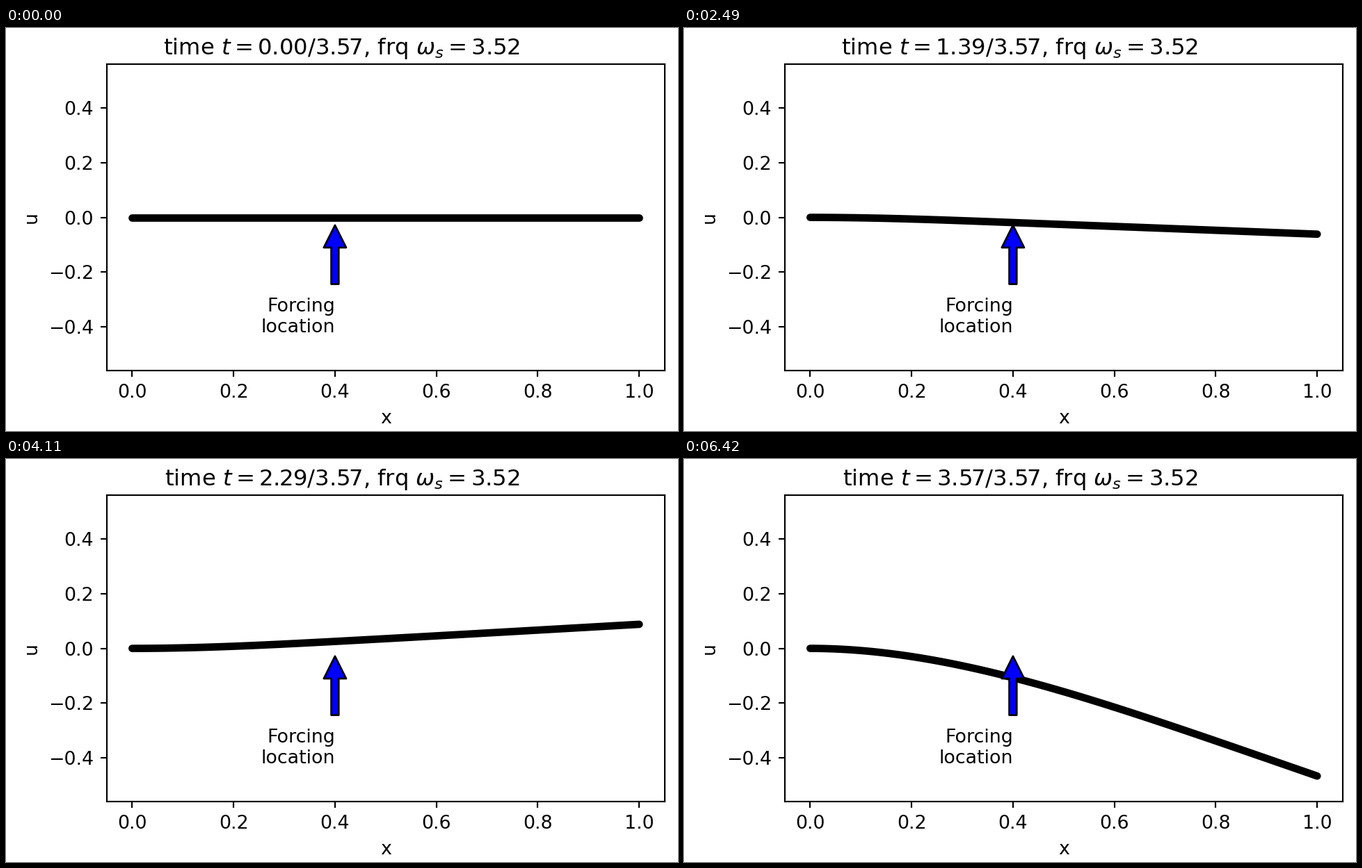
Write a matplotlib script that moves like this. It is 966 by 580 pixels and loops after 6.45 s.

```python
"""Cantilever beam driven at its first natural frequency by a point force."""
import numpy as np
import matplotlib.pyplot as plt
from matplotlib.animation import FuncAnimation
from matplotlib.patches import Polygon

W, H, DPI = 966, 580, 193.2
FRAMES, INTERVAL = 215, 30
X_FORCE = 0.4
MODES = 6

plt.rcParams["font.family"] = "DejaVu Sans"


def wave_number(n):
    """Root of cos(b) cosh(b) = -1 by Newton's method."""
    b = 1.875 if n == 1 else (n - 0.5) * np.pi
    for _ in range(20):
        f = np.cos(b) + 1 / np.cosh(b)
        df = -np.sin(b) - np.sinh(b) / np.cosh(b) ** 2
        b -= f / df
    return b


def mode_shape(b, x):
    s = (np.cosh(b) + np.cos(b)) / (np.sinh(b) + np.sin(b))
    return np.cosh(b * x) - np.cos(b * x) - s * (np.sinh(b * x) - np.sin(b * x))


betas = [wave_number(n) for n in range(1, MODES + 1)]
omega = betas[0] ** 2
t_end = 4 * np.pi / omega
x = np.linspace(0, 1, 101)


def deflection(t):
    """Response from rest to a unit force sin(omega t) at X_FORCE."""
    u = np.zeros_like(x)
    for n, b in enumerate(betas):
        w = b ** 2
        if n == 0:
            q = (np.sin(w * t) - w * t * np.cos(w * t)) / (2 * w ** 2)
        else:
            q = (np.sin(omega * t) - omega / w * np.sin(w * t)) / (w ** 2 - omega ** 2)
        u += q * mode_shape(b, X_FORCE) * mode_shape(b, x)
    return u


times = np.linspace(0, t_end, FRAMES)
u_max = np.abs(deflection(t_end)).max()

# The small margin keeps the pixel size from being truncated
fig = plt.figure(figsize=((W + 0.01) / DPI, (H + 0.01) / DPI), dpi=DPI)
ax = fig.add_subplot()
fig.subplots_adjust(left=0.15, right=0.98, bottom=0.15, top=0.91)
ax.set_xlim(-0.05, 1.05)
ax.set_ylim(-1.2 * u_max, 1.2 * u_max)
ax.set_xticks(np.arange(6) * 0.2)
ax.set_yticks(np.arange(-2, 3) * 0.2)
ax.set_xlabel("x")
ax.set_ylabel("u")

title = fig.suptitle("")
beam, = ax.plot(x, 0 * x, color="black", lw=4, solid_capstyle="round")

# Arrow in points, pointing up at the beam
pt = DPI / 72
cx = ax.transData.transform((X_FORCE, 0))[0]
tip, base = H - 283.8, H - 368.6
neck = tip - 12 * pt
side = [(2 * pt, base), (2 * pt, neck), (6 * pt, neck)]
outline = ([(cx + dx, y) for dx, y in side] + [(cx, tip)]
           + [(cx - dx, y) for dx, y in reversed(side)])
ax.add_patch(Polygon(outline, closed=True, transform=None, fc="blue", ec="black",
                     lw=1, joinstyle="round", zorder=3))
ax.text(X_FORCE, -0.9 * u_max, "Forcing\nlocation", ha="right", va="baseline")


def update(i):
    t = times[i]
    beam.set_ydata(deflection(t))
    title.set_text(rf"time $t={t:.2f}/{t_end:.2f}$, frq $\omega_s={omega:.2f}$")
    return beam, title


anim = FuncAnimation(fig, update, frames=FRAMES, interval=INTERVAL,
                     repeat=True, repeat_delay=0, blit=False)
plt.show()
```
